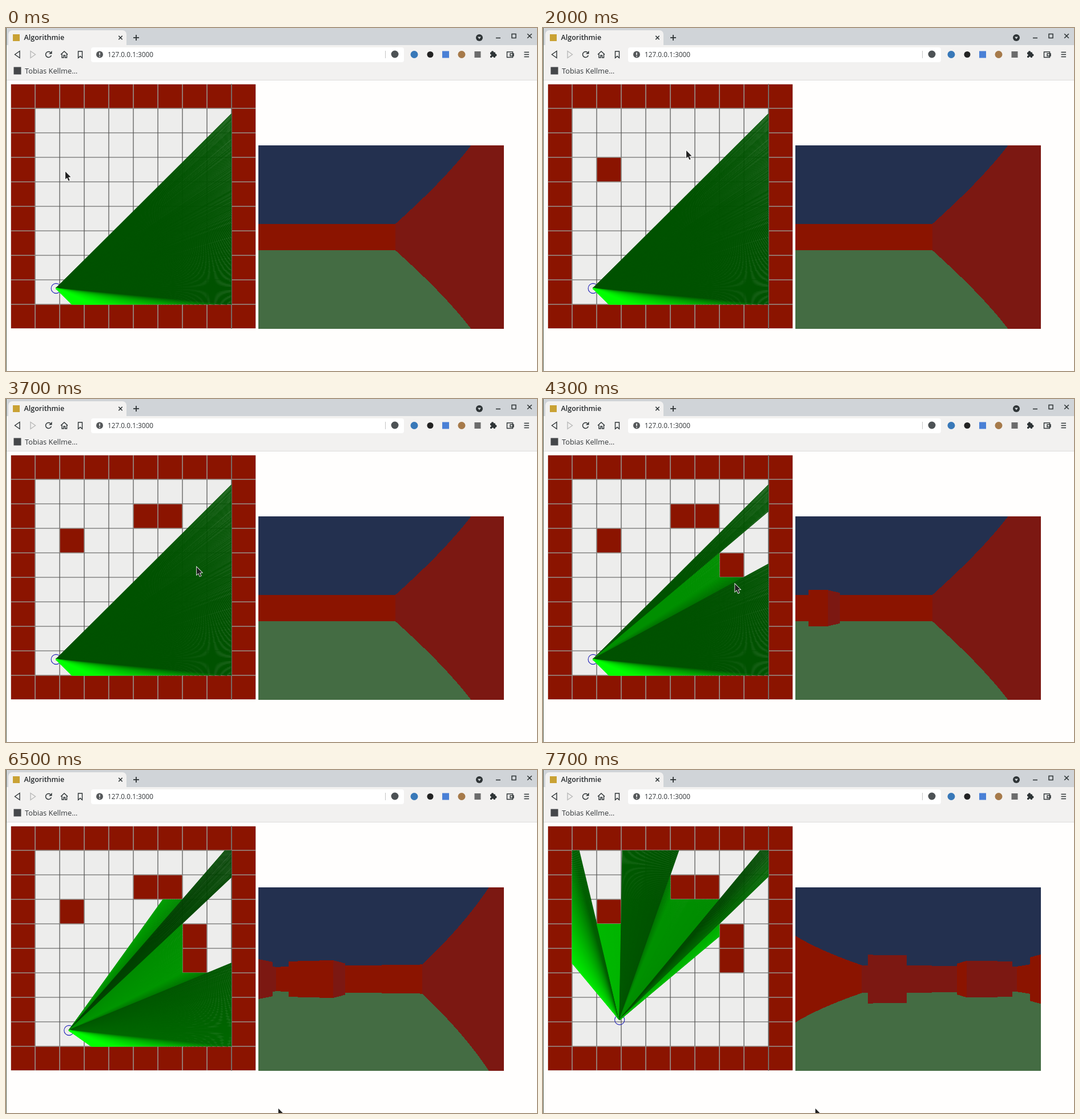
Recreate the animation shown at these times as an HTML page with a canvas. Size 930 px wide and 602 px high, loop 8 s.

```html
<!DOCTYPE html>
<html lang="fr">
<head>
<meta charset="utf-8">
<title>Algorithmie</title>
<style>
html, body { margin: 0; width: 100%; height: 100%; overflow: hidden; background: #fffefd; }
canvas { position: absolute; left: 0; top: 0; }
span { position: absolute; white-space: nowrap; line-height: 18px; color: #33373a; font-family: "Open Sans", "Noto Sans", sans-serif; }
#tab { left: 31.5px; top: 8px; font-size: 12.5px; font-weight: 600; color: #24282b; }
#url { left: 178px; top: 37px; font-size: 11.8px; }
#mark { left: 33px; top: 66px; font-size: 12.8px; }
</style>
</head>
<body>
<canvas id="stage" width="930" height="602"></canvas>
<span id="tab">Algorithmie</span>
<span id="url">127.0.0.1:3000</span>
<span id="mark">Tobias Kellme…</span>
<script>
const c = document.getElementById('stage').getContext('2d');
const LOOP = 8000, TICK = 100;
const CELL = 43, N = 10, OX = 8, OY = 98, SIZE = CELL * N;
const VIEW = { x: 442, y: 206, w: 430, h: 322 };
const RED = '#8b1400', SHADE = '#7c1812', INK = '#2e3436', BAR = '#f2f1f0';
const FOV = Math.PI / 2, TURN = 9.44 * Math.PI / 180, STRIDE = 7.55;

// column, row, tick when the wall appears
const blocks = [[2, 3, 1], [5, 2, 21], [6, 2, 29], [7, 4, 38], [7, 5, 47]];
// start tick, end tick, x, y reached by the pointer
const glides = [[2, 7, 200, 306], [7, 11, 288, 262], [11, 17, 240, 205], [19, 20, 251, 215],
  [22, 25, 281, 206], [29, 35, 332, 290], [36, 37, 334, 295], [39, 45, 337, 335], [48, 53, 477, 594]];

const clamp = (v, lo, hi) => Math.max(lo, Math.min(hi, v));
const ease = k => k * k * (3 - 2 * k);
// counts key presses: one per tick from start, n at most
const presses = (tick, start, n = 1) => clamp(tick - start + 1, 0, n);

function line(color, width, ...p) {
  c.strokeStyle = color;
  c.lineWidth = width;
  c.beginPath();
  for (let i = 0; i < p.length; i += 2) c.lineTo(p[i], p[i + 1]);
  c.stroke();
}
function rect(color, x, y, w, h, r = 0) {
  c.fillStyle = color;
  c.beginPath();
  c.roundRect(x, y, w, h, r);
  c.fill();
}
function disc(color, x, y, r) {
  c.fillStyle = color;
  c.beginPath();
  c.arc(x, y, r, 0, 7);
  c.fill();
}
function arc(color, width, x, y, r, from = 0, to = 7) {
  c.strokeStyle = color;
  c.lineWidth = width;
  c.beginPath();
  c.arc(x, y, r, from, to);
  c.stroke();
}
function cross(x, y, r) {
  line(INK, 1.6, x - r, y - r, x + r, y + r);
  line(INK, 1.6, x - r, y + r, x + r, y - r);
}

function pointer(tick) {
  let x = 104, y = 252;
  for (const [start, end, toX, toY] of glides) {
    const k = ease(clamp((tick - start) / (end - start), 0, 1));
    x += (toX - x) * k;
    y += (toY - y) * k;
  }
  return [x, y];
}

// walk right, turn left, walk along the new heading, turn left again
function pose(tick) {
  const first = presses(tick, 65) + 2 * presses(tick, 66) + presses(tick, 68);
  const second = 2.5 * presses(tick, 76, 2);
  const right = STRIDE * presses(tick, 61, 3);
  const ahead = STRIDE * (presses(tick, 69) + presses(tick, 72, 3));
  const a = first * TURN;
  return {
    x: 87.7 + right + ahead * Math.cos(a),
    y: 457 - ahead * Math.sin(a),
    a: a + second * TURN
  };
}

function isWall(col, row, tick) {
  return col < 1 || row < 1 || col > N - 2 || row > N - 2 ||
    blocks.some(b => b[0] === col && b[1] === row && b[2] <= tick);
}

function cast(p, angle, tick) {
  const dx = Math.cos(angle), dy = -Math.sin(angle);
  const gx = (p.x - OX) / CELL, gy = (p.y - OY) / CELL;
  let col = Math.floor(gx), row = Math.floor(gy), d = 0, flat = false;
  const sx = dx < 0 ? -1 : 1, sy = dy < 0 ? -1 : 1;
  const ux = Math.abs(1 / dx), uy = Math.abs(1 / dy);
  let tx = (dx < 0 ? gx - col : col + 1 - gx) * ux;
  let ty = (dy < 0 ? gy - row : row + 1 - gy) * uy;
  while (!isWall(col, row, tick)) {
    flat = ty < tx;
    if (flat) { d = ty; ty += uy; row += sy; }
    else { d = tx; tx += ux; col += sx; }
  }
  d *= CELL;
  return { x: p.x + dx * d, y: p.y + dy * d, depth: d * Math.cos(angle - p.a), flat };
}

function drawMap(tick) {
  const end = SIZE - CELL;
  rect('#ededec', OX + CELL, OY + CELL, end - CELL, end - CELL);
  for (let s = CELL; s < SIZE; s += CELL) {
    line('#505050', 1.2, OX + s, OY + CELL, OX + s, OY + end);
    line('#505050', 1.2, OX + CELL, OY + s, OX + end, OY + s);
  }
  const fillWalls = (color, inset) => {
    for (let i = 0; i < N * N; i++) {
      const col = i % N, row = Math.floor(i / N), side = CELL - 2 * inset;
      if (isWall(col, row, tick)) rect(color, OX + col * CELL + inset, OY + row * CELL + inset, side, side);
    }
  };
  c.save();
  c.beginPath();
  c.rect(OX + 0.7, OY + 0.7, SIZE - 1.4, SIZE - 1.4);
  c.clip();
  fillWalls('#98928c', -0.5);
  fillWalls(RED, 0.8);
  c.restore();
  line('#66625e', 1.2, OX + end, OY, OX + end, OY + SIZE);
}

function drawScene(tick) {
  const p = pose(tick), mid = VIEW.y + VIEW.h / 2;
  rect('#23304f', VIEW.x, VIEW.y, VIEW.w, VIEW.h / 2);
  rect('#446c43', VIEW.x, mid, VIEW.w, VIEW.h / 2);
  arc('#2222b8', 1.1, p.x, p.y, 8.6);
  for (let i = 0; i < VIEW.w; i++) {
    const hit = cast(p, p.a + FOV / 2 - FOV * (i + 0.5) / VIEW.w, tick);
    const green = Math.round(clamp(300 - 0.71 * hit.depth, 0, 255));
    line(`rgb(0,${green},0)`, 1.5, p.x, p.y, hit.x, hit.y);
    const half = Math.ceil(Math.min(VIEW.h, CELL * VIEW.h / hit.depth) / 2);
    c.fillStyle = hit.flat ? SHADE : RED;
    c.fillRect(VIEW.x + i, mid - half, 1, 2 * half);
  }
}

function drawPointer(tick) {
  const p = new Path2D('M0 0V13.5L3 10.7L5.4 16.2L7.6 15.2L5.2 9.9L9.4 9.6Z');
  c.save();
  c.translate(...pointer(tick));
  c.lineWidth = 1.6;
  c.strokeStyle = '#fff';
  c.stroke(p);
  c.fillStyle = '#222';
  c.fill(p);
  c.restore();
}

function drawTabs() {
  rect('#d0d4d8', 0, 0, 930, 31);
  rect(BAR, 0, 30, 930, 61);
  rect(BAR, 4, 4, 207, 28, [7, 7, 0, 0]);
  rect('#dddcdb', 0, 91, 930, 1);
  rect('#59624f', 0, 0, 1, 602);
  rect('#c9a234', 12, 11, 12, 12);
  cross(200.5, 17, 3.2);
  line(INK, 1.8, 223, 17, 233, 17);
  line(INK, 1.8, 228, 12, 228, 22);
  disc(INK, 829, 17, 6);
  c.fillStyle = '#d0d4d8';
  c.fill(new Path2D('M826 15.5h6l-3 4z'));
  line(INK, 1.6, 858, 17.5, 866, 17.5);
  c.lineWidth = 1.5;
  c.strokeRect(886, 10.5, 7, 7);
  cross(917, 14, 3.8);
}

function drawTools() {
  const icon = (path, color = INK) => {
    c.strokeStyle = color;
    c.lineWidth = 1.4;
    c.stroke(new Path2D(path));
  };
  icon('M24 40.5l-8.5 6l8.5 6z');
  icon('M43 40.5l8.5 6l-8.5 6z', '#b9b9b8');
  arc(INK, 1.5, 74.5, 46.5, 5, 0.3, 5.3);
  c.fillStyle = INK;
  c.fill(new Path2D('M80.5 40v5.5h-5.5z'));
  icon('M96 46.5l6-5.5l6 5.5M98 45.5v6.5h3v-4h2.5v4h3v-6.5');
  icon('M126.5 52.5v-11.5h7v11.5l-3.5-3z');

  rect('#fff', 149, 34, 548, 26, 4);
  disc('#55585a', 164, 46.5, 6);
  rect('#fff', 163.2, 43, 1.6, 4.5);
  rect('#fff', 163.2, 49, 1.6, 1.5);
  rect('#c4c4c4', 664, 40, 1, 13);
  disc('#4d5255', 681, 46, 6.5);

  disc('#3878b8', 715, 46.5, 6.5);
  disc('#222', 743, 46.5, 5.5);
  rect('#4a80d6', 764, 40.5, 12, 12);
  disc('#a67a4a', 798, 46.5, 6.5);
  rect('#6c6c6c', 820.5, 41, 11, 11);
  rect(INK, 848, 42.5, 9, 9.5, 1);
  disc(INK, 852, 42.5, 2.2);
  disc(INK, 857.3, 47.5, 2.2);
  disc(BAR, 848, 47.5, 1.7);
  disc(BAR, 852.5, 52, 1.7);
  icon('M877.5 42h10v9.5h-10zM883 45h6v4h-6z');
  icon('M907.5 42.5h8.5m-8.5 4h8.5m-8.5 4h8.5');
  rect('#45474a', 13.5, 68.5, 13, 13);
}

let last = -1;
function frame(now) {
  const tick = Math.floor(now % LOOP / TICK);
  if (tick !== last) {
    last = tick;
    rect('#fffefd', 0, 0, 930, 602);
    drawTabs();
    drawTools();
    drawMap(tick);
    drawScene(tick);
    drawPointer(tick);
  }
  requestAnimationFrame(frame);
}
frame(0);
</script>
</body>
</html>
```
